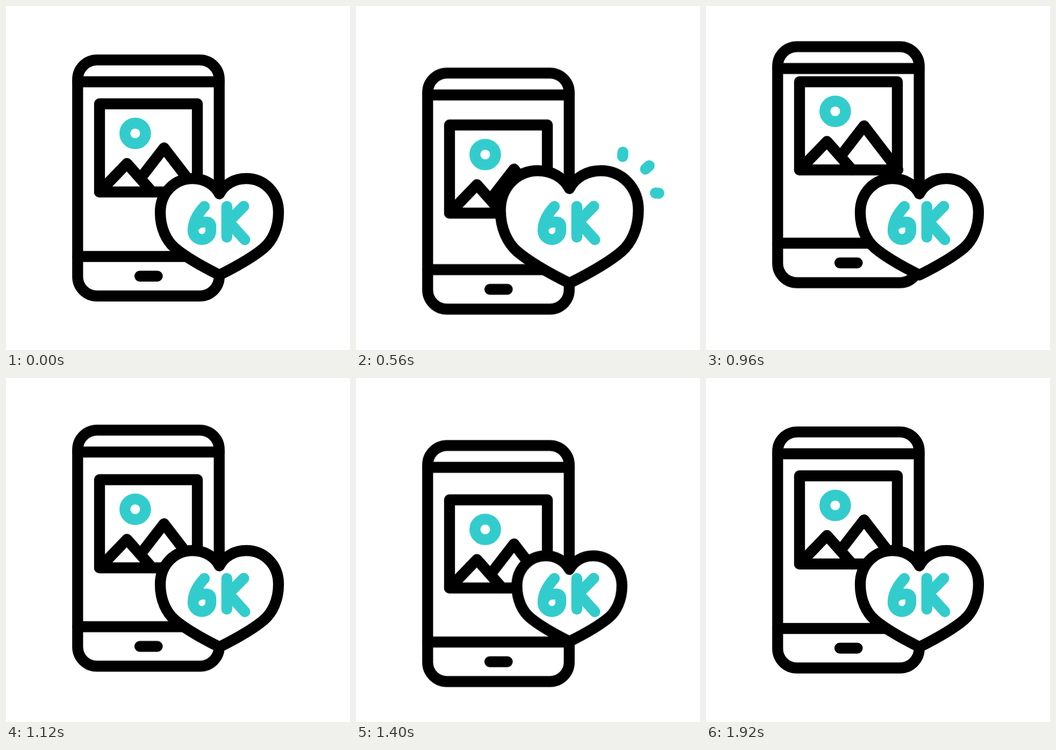
These frames come from a looping animation (640 px wide and 640 px high, 2000 ms). An HTML page:

```html
<!DOCTYPE html>
<html lang="en">
<head>
<meta charset="utf-8">
<title>Photo likes</title>
<style>
  @property --head { syntax: "<length>"; inherits: true; initial-value: 0px; }
  @property --tail { syntax: "<length>"; inherits: true; initial-value: 0px; }

  html, body { margin: 0; width: 100%; height: 100%; overflow: hidden; background: #fff; }
  svg { display: block; width: 640px; height: 640px; }

  svg * {
    --ease: cubic-bezier(.333, 0, .667, 1);
  }
  .ink, .teal {
    fill: none;
    stroke-width: 20.3;
    stroke-linecap: round;
    stroke-linejoin: round;
  }
  .ink { stroke: #000; }
  .teal { stroke: #33cccd; }

  /* The phone trails the photo by a single 40 ms step. */
  .phone, .photo { animation: bob 2s var(--ease) infinite both; }
  .phone { --lift: 26px; animation-delay: 40ms; }
  .photo { --lift: 50px; }
  @keyframes bob {
    0%, 2%, 86%, 100% { transform: translateY(0); }
    24%, 66% { transform: translateY(var(--lift)); }
    44% { transform: translateY(calc(-1 * var(--lift))); }
  }

  .heart {
    fill: #fff;
    vector-effect: non-scaling-stroke;
    transform-origin: 397px 409px;
    animation: beat 2s var(--ease) infinite;
  }
  @keyframes beat {
    0%, 8%, 48%, 56%, 96%, 100% { transform: scale(1); }
    21.5%, 69.5% { transform: scale(.88); }
    27%, 75% { transform: scale(1.172); }
    39.5%, 87.5% { transform: scale(.914); }
  }

  .rays {
    animation:
      head 2s var(--ease) infinite,
      tail 2s var(--ease) infinite,
      show 2s step-end infinite;
  }
  .rays path {
    stroke-dasharray: calc(var(--head) - var(--tail)) 300px;
    stroke-dashoffset: calc(-1 * var(--tail));
  }
  @keyframes head {
    0%, 24%, 72% { --head: 0px; }
    36%, 71.9%, 84%, 100% { --head: 100px; }
  }
  @keyframes tail {
    0%, 32%, 72%, 80% { --tail: 0px; }
    44%, 71.9%, 92%, 100% { --tail: 100px; }
  }
  @keyframes show {
    0%, 44%, 92%, 100% { opacity: 0; }
    24.2%, 72.2% { opacity: 1; }
  }
</style>
</head>
<body>
<svg viewBox="0 0 640 640">
  <g class="ink phone">
    <rect x="133.3" y="100.3" width="263.4" height="439.2" rx="36"/>
    <path d="M133.3 141H396.7M133.3 466H396.7M249 502.6H281.5"/>
  </g>

  <g class="photo">
    <rect class="ink" x="174" y="182" width="182" height="164"/>
    <path class="ink" d="M174 346L225 293L272 346M253 317L294 264L357 346"/>
    <circle class="teal" cx="240.4" cy="237" r="19.2"/>
  </g>

  <path class="ink heart" d="M397 349.5C388 332 369 321 347 321C314 321 287 347 287 384
    C287 414 299 437 314 450C334 467 364 484 397 500.5C430 484 460 467 480 450
    C495 437 507 414 507 384C507 347 480 321 447 321C425 321 406 332 397 349.5Z"/>

  <g class="teal">
    <path d="M369 373C356 387 348 402 348 418A16.5 16.5 0 0 0 381 418V410
      Q381 402 372 402H366C360 402 354 405 350 411"/>
    <path d="M410.8 373V430M442.3 372.7L414 401.3L444.3 434.8"/>
  </g>

  <g class="teal rays">
    <path pathLength="100" d="M496 280L498 249.5"/>
    <path pathLength="100" d="M538.5 303.5L565 279.5"/>
    <path pathLength="100" d="M557 348L581.7 349.2"/>
  </g>
</svg>
</body>
</html>
```
